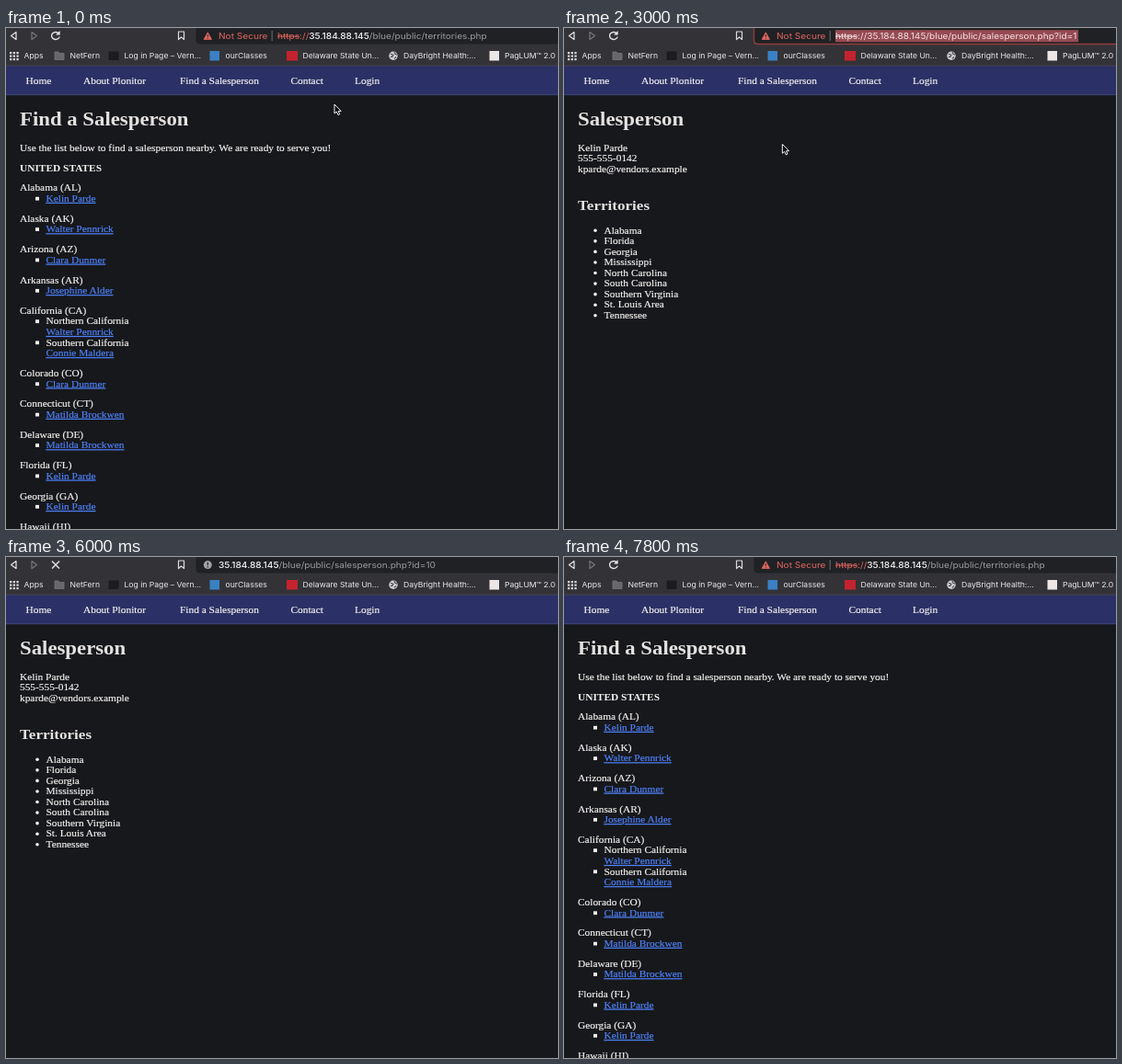
Recreate the animation shown at these times as an HTML page. Size 600x545 px, loop 8000 ms.

```html
<!DOCTYPE html>
<html lang="en">
<head>
<meta charset="utf-8">
<title>Find a Salesperson</title>
<style>
  html, body { margin: 0; width: 100%; height: 100%; overflow: hidden; background: #17181c; }
  svg { display: block; width: 100vw; height: 100vh; }
  text { white-space: pre; }
  .page { font: 16px "Liberation Serif", serif; fill: #f4f2f0; stroke: #f4f2f0; stroke-width: 0.25px; }
  .h1, .h2 { font-weight: 700; fill: #e4e2e0; stroke: none; }
  .h1 { font-size: 32px; }
  .h2 { font-size: 24px; }
  .bold { font-weight: 700; stroke: none; }
  .link { fill: #4f83fb; stroke: #4f83fb; text-decoration: underline; }
  .url { font: 14.2px Inter, sans-serif; fill: #9b9ca0; }
  .mark { font: 12.1px Inter, sans-serif; fill: #ececee; }
  .light { fill: #f1f1f2; }
  .host { fill: #f6f6f7; font-weight: 500; }
  .strong { fill: #f6f6f7; font-weight: 700; }
  .warn { fill: #e0665f; }
  .struck { text-decoration: line-through; }
  .picked { fill: #f4e2e2; }
  .hint { fill: #7593e6; font-weight: 700; }
</style>
</head>
<body>
<svg id="stage" viewBox="0 0 600 545" preserveAspectRatio="none" xmlns="http://www.w3.org/2000/svg"></svg>
<script>
const LOOP = 8000, TICK = 200;
const SX = 0.712, SY = 0.642;        // screen pixels per page pixel
const ROW = 18 * SY, GAP = 16 * SY;

const layers = {};
const span = (cls, s) => `<tspan class="${cls}">${s}</tspan>`;
const text = (x, y, s, cls = 'page') =>
  `<text class="${cls}" transform="translate(${x} ${y}) scale(${SX} ${SY})">${s}</text>`;
const rect = (x, y, w, h, fill) =>
  `<rect x="${x}" y="${y}" width="${w}" height="${h}" fill="${fill}"/>`;
const path = (d, stroke, fill = 'none', width = 1.2) =>
  `<path d="${d}" stroke="${stroke}" fill="${fill}" stroke-width="${width}" stroke-linejoin="round"/>`;
const circle = (x, y, r, fill) => `<circle cx="${x}" cy="${y}" r="${r}" fill="${fill}"/>`;
const globe = (x, y) => circle(x, y, 4.7, '#cfcfd1') +
  path(`M${x - 3} ${y - 2}l3 1l-1 2l-2 0M${x + 1} ${y - 4}l1 2l2 1M${x + 1} ${y + 3}l2 -2`, '#4a4a4e');

// Pages
const kelin = 'Kelin Parde', walter = 'Walter Pennrick', clara = 'Clara Dunmer', matilda = 'Matilda Brockwen';
const states = [
  ['Alabama (AL)', [kelin]],
  ['Alaska (AK)', [walter]],
  ['Arizona (AZ)', [clara]],
  ['Arkansas (AR)', ['Josephine Alder']],
  ['California (CA)', [walter, 'Connie Maldera'], ['Northern California', 'Southern California']],
  ['Colorado (CO)', [clara]],
  ['Connecticut (CT)', [matilda]],
  ['Delaware (DE)', [matilda]],
  ['Florida (FL)', [kelin]],
  ['Georgia (GA)', [kelin]],
  ['Hawaii (HI)', []],
];

function listPage() {
  let y = 177.4;
  let out = text(15, 106, 'Find a Salesperson', 'page h1') +
    text(15, 133.6, 'Use the list below to find a salesperson nearby. We are ready to serve you!') +
    text(15, 155.6, 'UNITED STATES', 'page bold');
  for (const [state, people, regions] of states) {
    out += text(15, y, state);
    people.forEach((name, i) => {
      y += ROW;
      out += rect(32, y - 5.2, 4, 3.8, '#f4f2f0');
      if (regions) {
        out += text(43.5, y, regions[i]);
        y += ROW;
      }
      out += text(43.5, y, name, 'page link');
    });
    y += ROW + GAP;
  }
  return out;
}

function personPage() {
  const details = [kelin, '555-555-0142', 'kparde@vendors.example'];
  const areas = ['Alabama', 'Florida', 'Georgia', 'Mississippi', 'North Carolina',
    'South Carolina', 'Southern Virginia', 'St. Louis Area', 'Tennessee'];
  return text(15, 106, 'Salesperson', 'page h1') +
    details.map((s, i) => text(15, 133.6 + i * ROW, s)).join('') +
    text(15, 197.8, 'Territories', 'page h2') +
    areas.map((s, i) => {
      const y = 223.5 + i * ROW;
      return circle(34, y - 3.2, 1.8, '#f4f2f0') + text(43.5, y, s);
    }).join('');
}

// Browser frame
function frame() {
  const nav = [[21.5, 'Home'], [84, 'About Plonitor'], [189, 'Find a Salesperson'], [309.5, 'Contact'], [379, 'Login']];
  const marks = [[19.5, 'Apps'], [69.5, 'NetFern'], [128.5, 'Log in Page – Vern...'], [238.5, 'ourClasses'],
    [322.5, 'Delaware State Un...'], [432, 'DayBright Health:...'], [542, 'PagLUM™ 2.0']];
  let out = rect(0, 0, 600, 41, '#333337') + rect(0, 41, 600, 32, '#2b3166') +
    rect(0, 40.5, 600, 1, '#45464f') + rect(0, 72.2, 600, 1, '#3d4473');
  out += nav.map(([x, s]) => text(x, 61.2, s)).join('');
  out += marks.map(([x, s]) => text(x, 33.2, s, 'mark')).join('');
  for (let i = 0; i < 9; i++) out += rect(4 + i % 3 * 3.7, 26 + Math.floor(i / 3) * 3.5, 2.3, 2.2, '#d9d9db');
  out += path('M53 26h4l1 1.5h5v7h-10z', '#77777b', '#68686c', 0.8);
  out += rect(111.5, 25.5, 11, 9.5, '#1d1c1c') + rect(221.5, 25, 10.5, 10.5, '#3b80c4') +
    rect(305, 25, 12, 10.5, '#c3232f') + rect(525.5, 25, 10.5, 10.5, '#ece6e6');
  out += globe(421, 30.3);
  out += path('M11 4.5v8l-5.5 -4z', '#e6e6e8') + path('M28 4.5v8l5.5 -4z', '#77777b') +
    path('M187.5 4h6v8.5l-3 -2.6l-3 2.6z', '#dcdcde');
  return out;
}

// Address bar
const box = (stroke = 'none') =>
  path('M206.5 -2V13.5Q206.5 17.5 211 17.5H602V-2Z', stroke, '#202124', 1.4);
const site = '35.184.88.145';
const territories = '/blue/public/territories.php', person = '/blue/public/salesperson.php';
const danger = path('M219.3 4.8l4.2 7.6h-8.4z', '#e0665f', '#e0665f', 0.8) +
  path('M219.3 7.2v2.4M219.3 10.6v1', '#202124', 'none', 1) +
  text(231, 12, 'Not Secure', 'url warn') + rect(288.7, 3, 0.9, 11, '#77777b');

const plainBar = box() + danger +
  text(295, 12, span('warn struck', 'https') + span('warn', '://') + span('host', site) + territories, 'url');
const pickedBar = (tail, width) => box('#8f3d40') + danger + rect(295, 2.2, width, 13, '#964b53') +
  text(295, 12, span('struck', 'https') + '://' + site + tail, 'url picked');
const loadingBar = box() + circle(219.3, 8.6, 4.5, '#a3a4a8') +
  path('M219.3 5.8v3.4M219.3 10.3v1.2', '#202124') +
  text(231, 12, span('host', site) + person + '?id=10', 'url');

const dropdown = rect(202, -2, 400, 74.5, '#28282b') + rect(202, 20, 400, 22, '#3b3b3f') +
  rect(202, 20, 2.2, 22, '#c7423f') + rect(202, 72, 400, 1.2, '#2b3166') +
  globe(219.5, 8.6) + globe(219.5, 31.5) +
  text(238, 12, 'https://' + span('host', site) + person + '?id=10', 'url') +
  rect(508, 2.5, 0.9, 12, '#e6e6e8') +
  text(238, 35, span('host', 'Find a ') + span('strong', 'Salesperson') + ' – ' +
    span('hint', 'https://' + site + person), 'url') +
  path('M220.6 56.2l3 2.8M221.4 53.8a2.7 2.7 0 1 1 -5.4 0a2.7 2.7 0 1 1 5.4 0', '#c4c4c7') +
  text(238, 58.3, span('light', 'https://' + site + person + '?id=10') + ' – Quendo Search', 'url');

const reload = path('M57.6 6.2a4.4 4 0 1 0 .6 3.4', '#e6e6e8', 'none', 1.4) +
  path('M58.4 3.6v3.6h-3.8z', '#e6e6e8', '#e6e6e8', 0.5);
const stop = path('M50 4.6l8 7.8M58 4.6l-8 7.8', '#e6e6e8', 'none', 1.4);

// Pointers, drawn around their hot spot
const ibeam = 'M-2.5 -5.5Q0 -5.5 0 -4V4Q0 5.5 -2.5 5.5M2.5 -5.5Q0 -5.5 0 -4V4Q0 5.5 2.5 5.5';
const pointers = {
  arrow: path('M0 0V10L2.3 8L4 11.6L5.7 10.8L4.2 7.4H7.2Z', '#f2f2f2', '#0c0c0d', 1),
  ibeam: path(ibeam, '#111', 'none', 2.6) + path(ibeam, '#f2f2f2', 'none', 1.1),
  hand: path('M-1 0Q.3 -1.2 1.2 0V3.6L5.6 4.6Q6.6 5 6.2 7L5 10.5H-.5L-3.8 6Q-3.2 4.6 -1 6Z', '#111', '#f2f2f2', 0.8),
};

const parts = {
  list: listPage(), person: personPage(), frame: frame(), reload, stop,
  plain: plainBar, pickedList: pickedBar(territories, 228), pickedPerson: pickedBar(person + '?id=1', 264),
  loading: loadingBar, dropdown, ...pointers,
};
const stage = document.getElementById('stage');
stage.innerHTML = rect(0, 0, 600, 545, '#17181c') +
  Object.entries(parts).map(([id, body]) => `<g id="${id}">${body}</g>`).join('');
for (const id in parts) layers[id] = document.getElementById(id);

// time, page, address bar, button
const scenes = [
  [0, 'list', 'plain', 'reload'],
  [1400, 'list', 'pickedList', 'reload'],
  [2800, 'person', 'pickedPerson', 'reload'],
  [4600, 'person', 'dropdown', 'reload'],
  [5600, 'person', 'loading', 'stop'],
  [6400, 'list', 'plain', 'reload'],
];
// time, x, y, pointer
const moves = [
  [0, 357, 83, 'arrow'], [200, 357, 83, 'arrow'], [1000, 545, 9, 'ibeam'], [1600, 545, 9, 'arrow'],
  [2200, 80.5, 177, 'ibeam'], [2400, 78, 185, 'hand'], [2800, 78, 185, 'arrow'],
  [3400, 556, 9, 'ibeam'], [3600, 556, 9, ''], [6600, 569, 9, 'ibeam'], [7000, 569, 9, ''],
];
const lastAt = (table, t) => table.findLastIndex(row => row[0] <= t);

function show(t) {
  const [, ...visible] = scenes[lastAt(scenes, t)];
  const i = lastAt(moves, t);
  const [t0, x0, y0, pointer] = moves[i];
  const [t1, x1, y1] = moves[i + 1] || [LOOP, x0, y0];
  const k = (t - t0) / (t1 - t0);
  visible.push('frame', pointer);
  for (const id in layers) layers[id].style.display = visible.includes(id) ? '' : 'none';
  if (pointer) layers[pointer].setAttribute('transform', `translate(${x0 + (x1 - x0) * k} ${y0 + (y1 - y0) * k})`);
}

function tick() {
  const t = performance.now() % LOOP;
  show(Math.floor(t / TICK) * TICK);
  requestAnimationFrame(tick);
}
tick();
</script>
</body>
</html>
```
